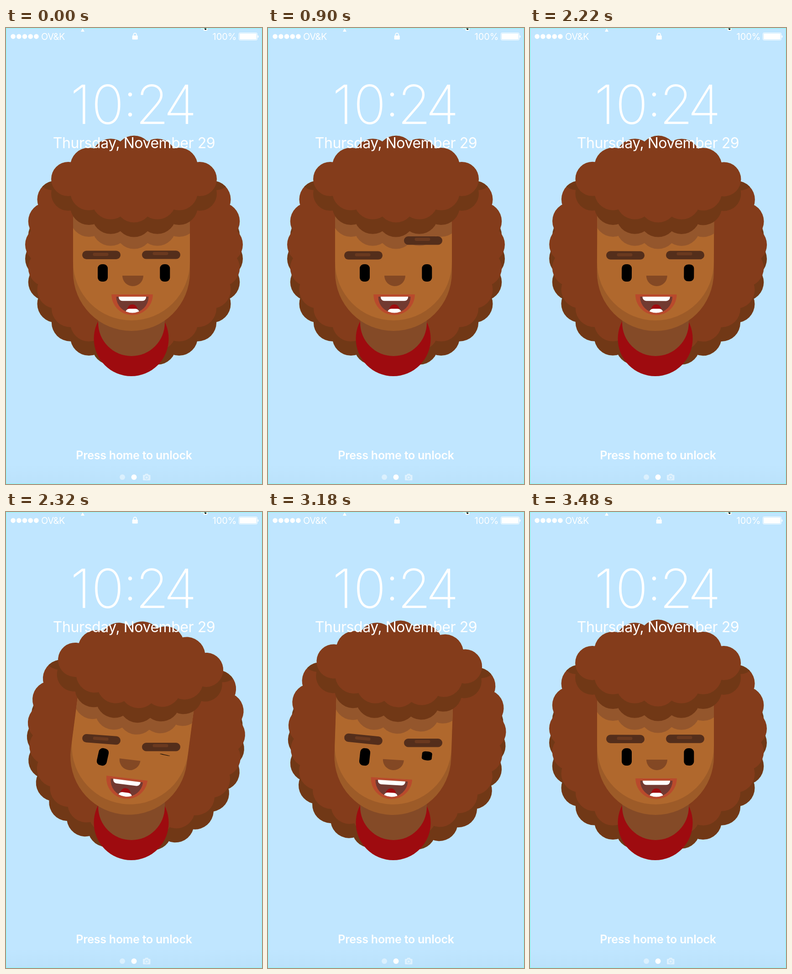
These frames come from a looping animation (561x998 px, 3500 ms). An HTML page with a canvas:

```html
<!DOCTYPE html>
<html lang="en">
<head>
<meta charset="utf-8">
<title>Lock screen wink</title>
<style>
html, body { margin: 0; width: 100%; height: 100%; overflow: hidden; background: #c0e6ff; }
canvas { display: block; }
</style>
</head>
<body>
<canvas id="stage" width="561" height="998"></canvas>
<script>
const ctx = document.getElementById('stage').getContext('2d');
const LOOP = 3500, STEP = 20;
const RAD = Math.PI / 180;
const HAIR = '#843c1b', HAIR_DARK = '#713816', RED = '#9e0b0f', WHITE = '#fff';

// Damped spring from 0 to 1; w is its angular speed per second.
function spring(t, start, w) {
  const s = (t - start) / 1000;
  if (s <= 0) return 0;
  const k = 0.833;
  return 1 - Math.exp(-k * w * s) * (Math.cos(w * s) + k * Math.sin(w * s));
}

// Critically damped, without overshoot.
function soft(t, start) {
  const s = Math.max(0, t - start) / 1000 * 16;
  return 1 - Math.exp(-s) * (1 + s);
}

function turned(x, y, deg, dx, dy, draw) {
  ctx.save();
  ctx.translate(x + dx, y + dy);
  ctx.rotate(deg * RAD);
  ctx.translate(-x, -y);
  draw();
  ctx.restore();
}

function addOval(x, y, rx, ry = rx) {
  ctx.moveTo(x + rx, y);
  ctx.ellipse(x, y, rx, ry, 0, 0, 2 * Math.PI);
}

function disc(x, y, r, color) {
  ctx.fillStyle = color;
  ctx.beginPath();
  addOval(x, y, r);
  ctx.fill();
}

function box(x, y, w, h, r, color) {
  ctx.fillStyle = color;
  ctx.beginPath();
  ctx.roundRect(x, y, w, h, r);
  ctx.fill();
}

function bowl(x, y, r, color) {
  ctx.fillStyle = color;
  ctx.beginPath();
  ctx.arc(x, y, r, 0, Math.PI);
  ctx.fill();
}

// Ring of curls behind the head, open at the top.
function backPath(cy) {
  ctx.beginPath();
  addOval(280.5, cy, 200);
  for (let a = -30; a <= 210; a += 15) {
    addOval(280.5 + 197.5 * Math.cos(a * RAD), cy + 197.5 * Math.sin(a * RAD), 41);
  }
}

// Lens of curls over the forehead, with a smaller curl at each end.
function fringe(drop, color) {
  ctx.fillStyle = color;
  ctx.beginPath();
  addOval(280.5, 330.5 + drop, 145, 65);
  addOval(136.5, 330.5 + drop, 37.5);
  addOval(424.5, 330.5 + drop, 37.5);
  for (let a = 60; a <= 120; a += 15) {
    const x = 280.5 + 197.5 * Math.cos(a * RAD);
    const y = 474 - 197.5 * Math.sin(a * RAD);
    addOval(x, y + drop, 41);
    addOval(x, 661 - y + drop, 41);
  }
  ctx.fill();
}

function facePath(cy) {
  ctx.beginPath();
  ctx.moveTo(147, 370);
  ctx.lineTo(403, 370);
  ctx.lineTo(403, cy);
  ctx.arc(275, cy, 128, 0, Math.PI);
  ctx.closePath();
}

function mouth() {
  bowl(276.5, 583, 45.3, '#b94a2c');
  ctx.save();
  ctx.beginPath();
  ctx.arc(277, 588, 35.5, 0, Math.PI);
  ctx.clip();
  ctx.fillStyle = '#723a31';
  ctx.fillRect(230, 580, 95, 50);
  disc(277, 616, 11, RED);
  box(262, 614.5, 30, 12, [9, 9, 4, 4], WHITE);
  ctx.restore();
  box(247, 588, 60, 9.3, [0, 0, 8, 8], WHITE);
}

function eye(x, y, deg, open) {
  if (open <= 0) return;
  ctx.save();
  ctx.translate(x, y);
  ctx.rotate(deg * RAD);
  ctx.scale(1, open);
  box(-11, -19, 22, 38, 9, '#000');
  ctx.restore();
}

function brow(x, y, deg, shine) {
  turned(x, y, deg, 0, 0, () => {
    box(x - 42, y - 9.2, 84, 18.4, 9.2, '#542e1b');
    box(x - 18.5, y + shine - 3.4, 34, 6.8, 3.4, '#6a391f');
  });
}

function head(t) {
  const wink = spring(t, 2210, 19.5) - spring(t, 3116, 17);
  const lean = spring(t, 2210, 23) - spring(t, 3116, 23);
  const raise = spring(t, 750, 21) - spring(t, 1690, 17);
  const sink = spring(t, 750, 21) - spring(t, 3116, 17);
  const tilt = soft(t, 2210) - soft(t, 3116);

  const inHair = draw => turned(280.5, 556, 3.9 * wink, 0, 0, draw);
  const inSkin = draw => turned(275, 490, 7.2 * lean, 0, 0, draw);
  const inFace = draw => turned(275, 490, 7.2 * wink, 0, 0, draw);
  const inFringe = draw => turned(280.5, 330, 4.5 * wink, 15 * wink, 4 * wink, draw);
  const rest = ctx.getTransform();

  inHair(() => {
    ctx.fillStyle = HAIR_DARK;
    backPath(505);
    ctx.fill();
    ctx.fillStyle = HAIR;
    backPath(474);
    ctx.fill();
    ctx.clip();
    ctx.setTransform(rest);
    inFringe(() => {
      disc(102, 316, 39, HAIR_DARK);
      disc(459, 316, 39, HAIR_DARK);
    });
  });

  disc(274.5, 680, 82, RED);
  ctx.fillStyle = '#844a27';
  ctx.fillRect(202, 560, 146, 86);
  bowl(275, 645, 73, '#844a27');

  inSkin(() => {
    facePath(535);
    ctx.fillStyle = '#9d5b28';
    ctx.fill();
    ctx.clip();
    facePath(512);
    ctx.fillStyle = '#b0682d';
    ctx.fill();
    ctx.setTransform(rest);
    inFringe(() => fringe(58, '#94562c'));
  });

  inFringe(() => {
    fringe(32, HAIR_DARK);
    fringe(0, HAIR);
  });

  inFace(() => {
    bowl(278, 542, 23, '#834824');
    mouth();
  });

  eye(212, 536, 13 * wink, 1);
  eye(348.3, 536 - 4.5 * wink, 13 * wink, 1 - wink);
  brow(209, 496.8 + 0.8 * sink, 8 * tilt, -1.3);
  brow(340, 496.4 - 29 * raise + 18.3 * wink, 0, -2.8);
}

function label(text, x, y, size, weight, align, spacing) {
  ctx.font = `${weight} ${size}px Inter, "Open Sans", sans-serif`;
  ctx.textAlign = align;
  ctx.letterSpacing = spacing + 'px';
  ctx.fillText(text, x, y);
}

// Places one digit so that its ink is centred on x.
function digit(d, x) {
  ctx.font = '200 118px Inter, Roboto, sans-serif';
  ctx.textAlign = 'left';
  ctx.letterSpacing = '0px';
  const m = ctx.measureText(d);
  ctx.fillText(d, x - (m.actualBoundingBoxRight - m.actualBoundingBoxLeft) / 2, 209.5);
}

function statusBar() {
  for (let i = 0; i < 5; i++) disc(15.6 + 12.7 * i, 18.6, 5.3, WHITE);
  label('OV&K', 77, 25.5, 20, 400, 'left', -0.4);
  label('100%', 505.5, 25.5, 20, 400, 'right', 0);

  box(276.7, 16.5, 12, 8.8, 1.2, WHITE);
  ctx.strokeStyle = WHITE;
  ctx.lineWidth = 1.7;
  ctx.beginPath();
  ctx.moveTo(279.3, 17);
  ctx.lineTo(279.3, 14.8);
  ctx.arc(282.7, 14.8, 3.4, Math.PI, 0);
  ctx.lineTo(286.1, 17);
  ctx.stroke();

  ctx.lineWidth = 1;
  ctx.beginPath();
  ctx.roundRect(510.5, 10.5, 40, 16, 2.5);
  ctx.stroke();
  box(512, 12, 37, 13, 1.2, WHITE);
  box(551.5, 16, 2, 5.5, [0, 2, 2, 0], WHITE);

  ctx.beginPath();
  ctx.moveTo(164, 8);
  ctx.lineTo(168, 1);
  ctx.lineTo(172, 8);
  ctx.fill();
}

function pointer() {
  ctx.fillStyle = WHITE;
  ctx.fillRect(427, 0, 15, 2);
  ctx.fillRect(433, 1, 8, 5);
  ctx.fillStyle = '#111';
  ctx.beginPath();
  ctx.moveTo(434, 0);
  ctx.lineTo(439, 0);
  ctx.lineTo(439, 4);
  ctx.lineTo(436, 4);
  ctx.fill();
}

function pager() {
  disc(255, 983, 6, 'rgba(255,255,255,.45)');
  disc(280.5, 983, 6, WHITE);
  ctx.fillStyle = 'rgba(255,255,255,.5)';
  ctx.beginPath();
  ctx.roundRect(300, 978, 16.5, 12, 1.5);
  ctx.moveTo(304, 978);
  ctx.lineTo(305.5, 975.5);
  ctx.lineTo(311, 975.5);
  ctx.lineTo(312.5, 978);
  addOval(308.2, 983.8, 4.2);
  ctx.fill('evenodd');
  disc(308.2, 983.8, 2.8, 'rgba(255,255,255,.5)');
}

function screen() {
  ctx.fillStyle = WHITE;
  statusBar();
  ctx.fillStyle = WHITE;
  digit('1', 161);
  digit('0', 223.3);
  digit('2', 320.5);
  digit('4', 382.5);
  disc(272, 145.5, 4.2, WHITE);
  disc(272, 189.5, 4.2, WHITE);
  label('Thursday, November 29', 280.5, 263, 32, 400, 'center', -0.45);
  label('Press home to unlock', 280.5, 943.8, 25, 600, 'center', -0.25);
  pager();
  pointer();
}

function backdrop() {
  ctx.fillStyle = '#c0e6ff';
  ctx.fillRect(0, 0, 561, 998);
  const fade = ctx.createLinearGradient(0, 955, 0, 998);
  fade.addColorStop(0, 'rgba(150,195,220,0)');
  fade.addColorStop(1, 'rgba(150,195,220,.12)');
  ctx.fillStyle = fade;
  ctx.fillRect(0, 955, 561, 43);
}

function render() {
  const now = performance.now() % LOOP;
  backdrop();
  head(now - now % STEP);
  screen();
  ctx.strokeStyle = '#80fff0';
  ctx.lineWidth = 1;
  ctx.strokeRect(0.5, 0.5, 560, 997);
  requestAnimationFrame(render);
}

render();
</script>
</body>
</html>
```
